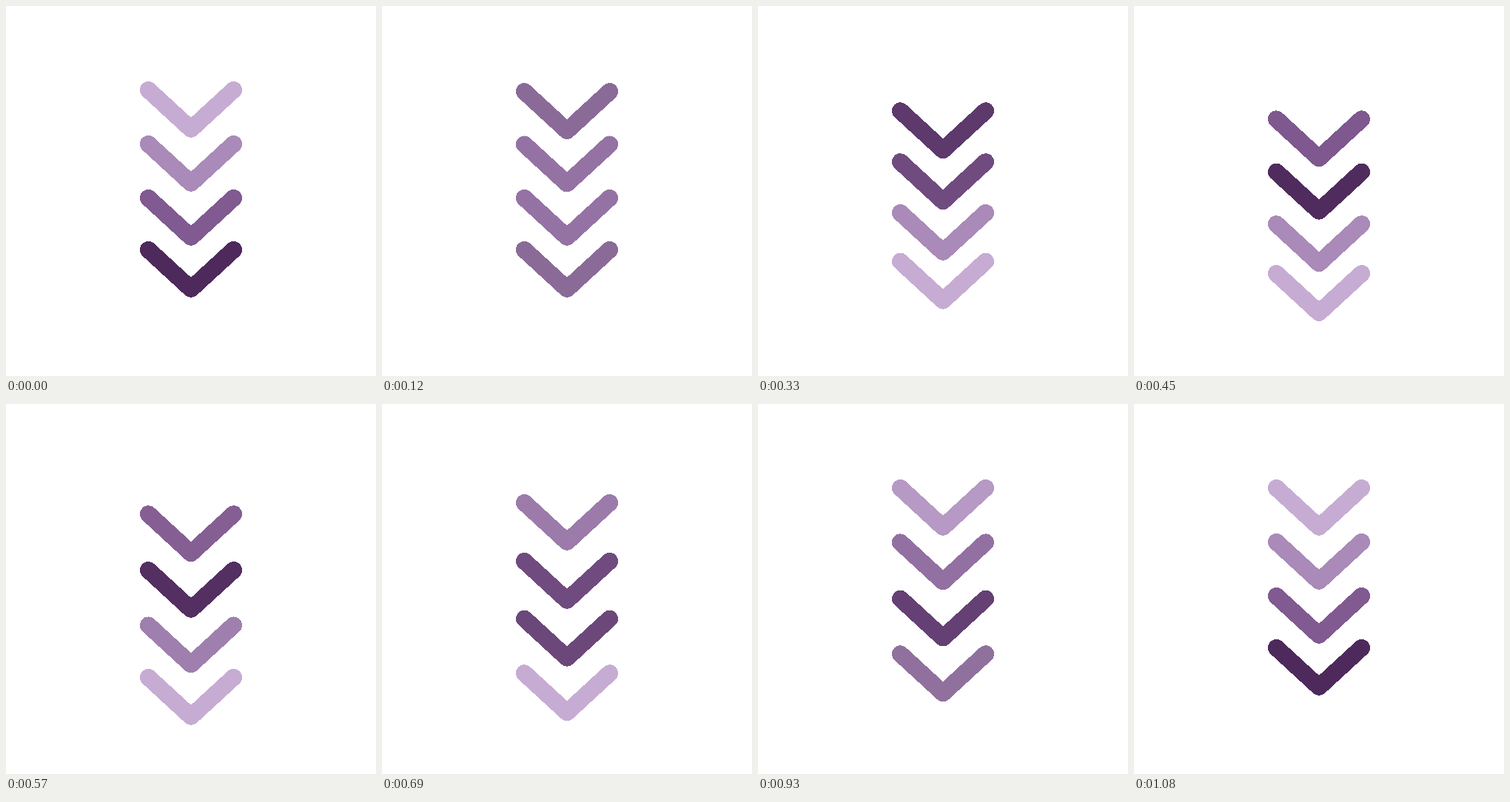
An HTML page that plays this animation: 500 px wide and 500 px high, repeating every 1110 ms.

```html
<!DOCTYPE html>
<html lang="en">
<head>
<meta charset="utf-8">
<title>Scroll arrows</title>
<style>
  html, body { margin: 0; width: 100%; height: 100%; overflow: hidden; background: #fff; }
  svg { display: block; width: 100%; height: 100%; }
  path {
    fill: none;
    stroke-width: 23;
    stroke-linecap: round;
    stroke-linejoin: round;
    shape-rendering: crispEdges;
  }
</style>
</head>
<body>
<svg viewBox="0 0 500 500">
  <path d="M192.4 113.4 250 166.4 307.6 113.4"/>
  <path d="M192.4 186.4 250 239.4 307.6 186.4"/>
  <path d="M192.4 259.4 250 312.4 307.6 259.4"/>
  <path d="M192.4 329.4 250 382.4 307.6 329.4"/>
</svg>
<script>
  const TICK = 30, TICKS = 37, DROP = 40;
  const arrows = [...document.querySelectorAll('path')];

  // Light to dark
  const shades = [[198, 172, 211], [169, 138, 184], [128, 90, 144], [78, 42, 92]];

  // Shade of each arrow, from top to bottom
  const looks = [[0, 1, 2, 3], [3, 2, 1, 0], [2, 3, 1, 0], [1, 2, 3, 0], [0, 1, 2, 3]];

  // Start and end tick of each change of look
  const fades = [[1, 7], [8, 16], [17, 26.6], [26.6, 36]];

  const ease = (tick, start, end) => {
    const p = Math.min(1, Math.max(0, (tick - start) / (end - start)));
    return p * p * (3 - 2 * p);
  };

  // Lower arrows leave later and return more slowly
  const offset = (i, tick) =>
    DROP * (ease(tick, 2 + i, 16 + i) - ease(tick, 16 + i, 30 + 2 * i));

  const color = (i, tick) => {
    let n = fades.length - 1;
    while (n > 0 && tick < fades[n][0]) n--;
    const k = ease(tick, ...fades[n]);
    const from = shades[looks[n][i]], to = shades[looks[n + 1][i]];
    return `rgb(${from.map((c, j) => Math.round(c + (to[j] - c) * k))})`;
  };

  const begin = performance.now();

  function draw() {
    const tick = Math.floor((performance.now() - begin) / TICK) % TICKS;
    arrows.forEach((arrow, i) => {
      arrow.setAttribute('transform', `translate(0 ${offset(i, tick).toFixed(2)})`);
      arrow.setAttribute('stroke', color(i, tick));
    });
    requestAnimationFrame(draw);
  }
  draw();
</script>
</body>
</html>
```
